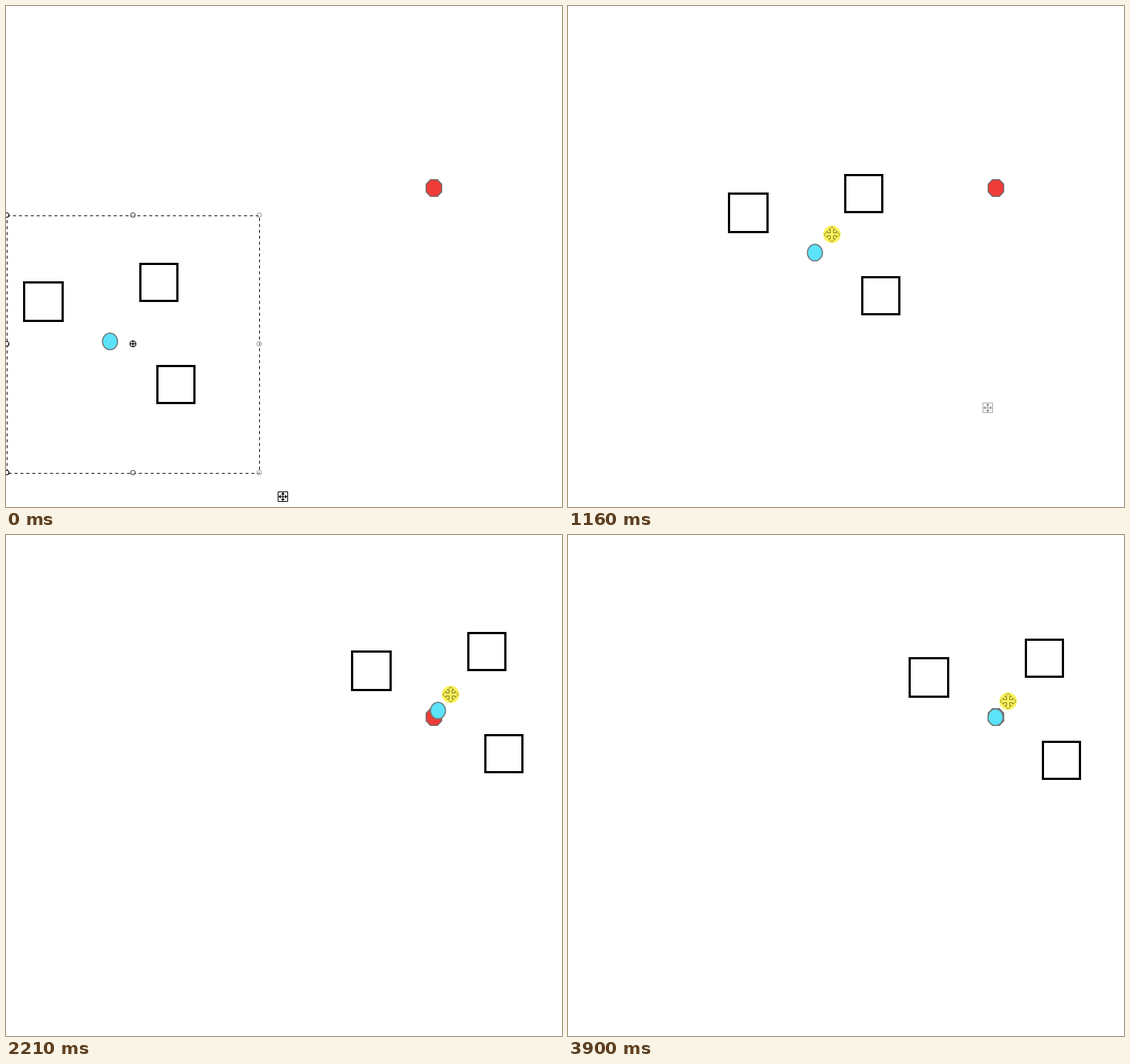
Animation of 751x677 px, one loop 3.93 s. Source, as an HTML page with a canvas:

```html
<!DOCTYPE html>
<html>
<head>
<meta charset="utf-8">
<title>Moving a selection</title>
<style>
html, body { margin: 0; height: 100%; overflow: hidden; background: #fff; }
canvas { display: block; }
</style>
</head>
<body>
<canvas id="stage" width="751" height="677"></canvas>
<script>
const ctx = document.getElementById('stage').getContext('2d');
const LOOP = 3930, STEP = 46.3;
const PRESS = 740, DRAG = 870, LEAD = 5;

const mix = (a, b, k) => a + (b - a) * k;
const clamp = k => Math.min(1, Math.max(0, k));
const easeIn = p => k => k ** p;
const easeOut = p => k => 1 - (1 - k) ** p;
const linear = easeIn(1);

// Legs of the drag: a swing up, an overshoot, then settling on the red disc
const dragLegs = [
  { from: DRAG, to: 1151, x: 193, y: -120, ease: easeIn(1.4) },
  { from: 1151, to: 1660, x: 393, y: -235, ease: easeOut(3) },
  { from: 1660, to: 2165, x: 443, y: -216, ease: easeOut(1.2) },
  { from: 2440, to: 2930, x: 437, y: -205, ease: easeOut(2) },
  { from: 2930, to: 3900, x: 437, y: -207, ease: linear }
];

// Offset of the group in whole pixels
function dragAt(t) {
  let x = 0, y = 0;
  for (const leg of dragLegs) {
    const k = leg.ease(clamp((t - leg.from) / (leg.to - leg.from)));
    x = mix(x, leg.x, k);
    y = mix(y, leg.y, k);
  }
  return [Math.round(x), Math.round(y)];
}

function cursorAt(t) {
  if (t < PRESS) {
    const k = easeOut(1.5)(clamp((t - 40) / 500));
    return [mix(600, 156.5, k), mix(246, 429.5, k)];
  }
  const [x, y] = dragAt(t + LEAD);
  return [x + 157.5, y + 431.5];
}

function paint(fill, stroke, width = 1) {
  if (fill) { ctx.fillStyle = fill; ctx.fill(); }
  if (stroke) { ctx.strokeStyle = stroke; ctx.lineWidth = width; ctx.stroke(); }
}

function oval(x, y, rx, ry, fill, stroke, width) {
  ctx.beginPath();
  ctx.ellipse(x, y, rx, ry, 0, 0, 7);
  paint(fill, stroke, width);
}

function poly(points, fill, stroke, width) {
  ctx.beginPath();
  points.forEach(([x, y]) => ctx.lineTo(x, y));
  ctx.closePath();
  paint(fill, stroke, width);
}

function box(x, y, w, h, width) {
  ctx.beginPath();
  ctx.rect(x, y, w, h);
  paint(null, '#000', width);
}

function plus(x, y, r) {
  ctx.beginPath();
  ctx.moveTo(x - r, y); ctx.lineTo(x + r, y);
  ctx.moveTo(x, y - r); ctx.lineTo(x, y + r);
  paint(null, '#000', 1.2);
}

// Repeats points given for the upper arm of a cross on all four sides
function fourWay(points) {
  const turn = ([x, y], n) => n ? turn([-y, x], n - 1) : [x, y];
  return [0, 1, 2, 3].flatMap(n => points.map(p => turn(p, n)));
}

function drawRed() {
  const disc = fourWay([[-5, -11], [5, -11]]).map(([x, y]) => [578 + x * .95, 246 + y * 1.02]);
  poly(disc, '#ef3c38', '#74696a', 1.5);
}

function drawGroup() {
  box(24.5, 373.5, 52, 52, 3);
  box(181.5, 348.5, 50, 50, 3);
  box(204.5, 486.5, 50, 50, 3);
  oval(140.5, 453.3, 10.2, 11.2, '#5ce3f9', '#6e7a7e', 1.5);
}

function drawHandle(alpha) {
  ctx.save();
  ctx.globalAlpha = alpha;
  ctx.translate(374, 663);
  box(-6.5, -6.5, 13, 13, 1);
  plus(0, 0, 5);
  for (let i = 0; i < 4; i++) {
    poly([[0, -6], [2.6, -3], [-2.6, -3]], '#000');
    ctx.rotate(Math.PI / 2);
  }
  ctx.restore();
}

function drawSelection(t) {
  ctx.setLineDash([4, 4]);
  box(1.5, 283.5, 341, 348, 1);
  ctx.setLineDash([]);
  for (let i = 0; i < 9; i++) {
    if (i === 4) continue;
    const col = i % 3, row = Math.floor(i / 3);
    // The fade runs across the columns first, later down the rows
    ctx.globalAlpha = 1 - mix(col, row, clamp(t / 550)) * .33;
    oval(1 + col * 170.5, 282.5 + row * 174, 3, 3, '#fff', '#000', 1.2);
  }
  ctx.globalAlpha = 1;
  oval(171.5, 456.5, 4, 4, '#fff', '#000', 1.2);
  plus(171.5, 456.5, 4);
}

function drawCursor(x, y, pressed) {
  ctx.save();
  ctx.translate(x, y);
  if (pressed) oval(0, 0, 11.8, 11.8, '#fbf25c');
  const arm = [[-2, -2], [-2, -6], [-4.5, -6], [0, -10.5], [4.5, -6], [2, -6]];
  poly(fourWay(arm), pressed ? '#fbf25c' : '#fff', pressed ? '#857e22' : '#2c3040');
  ctx.restore();
}

function draw(time) {
  const t = Math.max(0, 40 + Math.floor((time - 40) / STEP) * STEP);
  ctx.fillStyle = '#fff';
  ctx.fillRect(0, 0, 751, 677);
  drawRed();
  ctx.save();
  ctx.translate(...dragAt(t));
  drawGroup();
  if (t < DRAG) drawSelection(t);
  drawHandle(mix(1, .35, clamp((t - DRAG) / 250)));
  ctx.restore();
  if (time >= 40) drawCursor(...cursorAt(t), t >= PRESS);
}

const start = performance.now();
function tick() {
  draw((performance.now() - start) % LOOP);
  requestAnimationFrame(tick);
}
tick();
</script>
</body>
</html>
```
